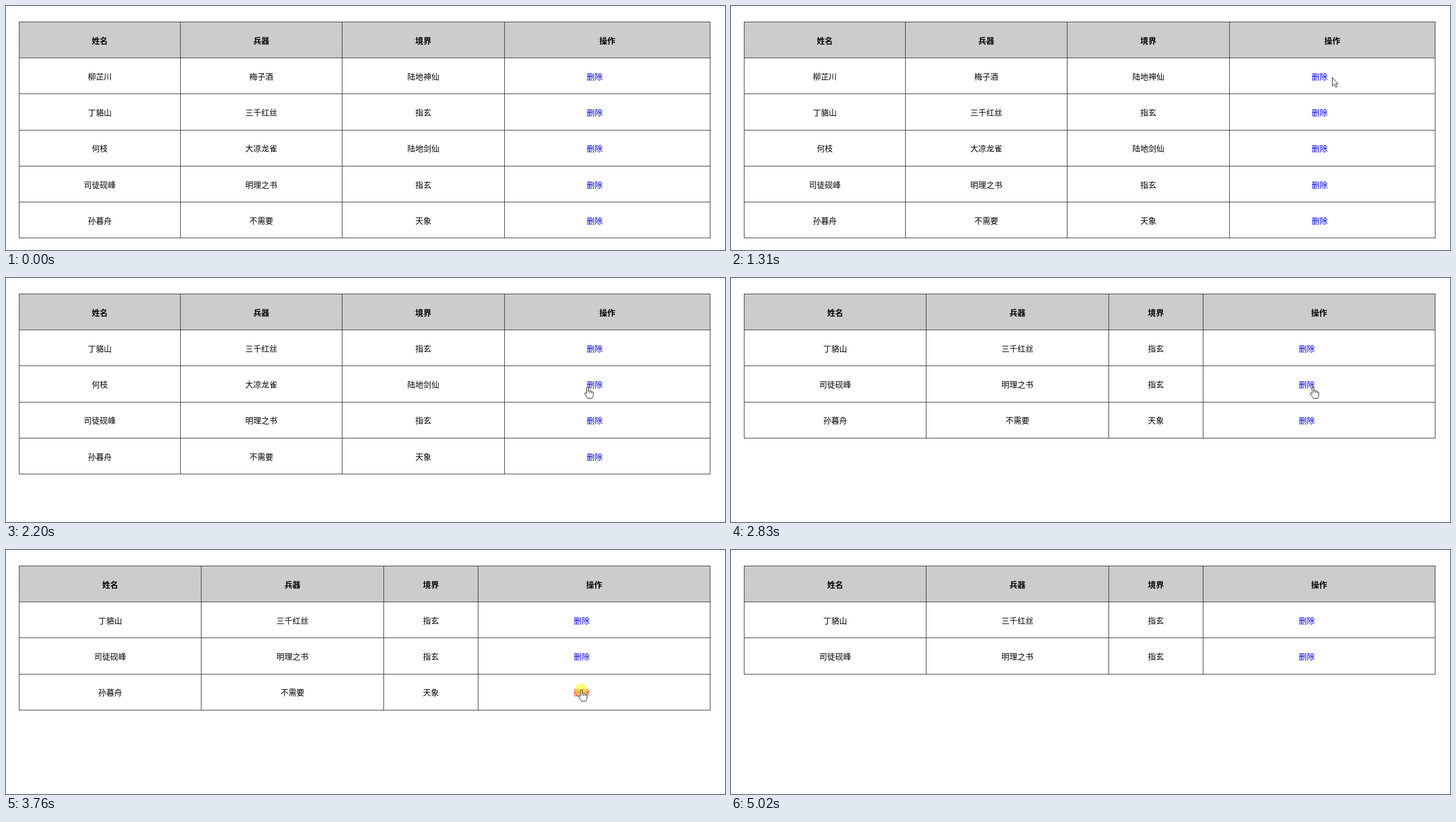
These frames come from a looping animation (1280 by 435 pixels, 5.33 s). An HTML page with a canvas:

```html
<!DOCTYPE html>
<html lang="zh-CN">
<head>
<meta charset="utf-8">
<style>
  html, body { margin: 0; width: 100%; height: 100%; overflow: hidden; background: #fff; }
  canvas { display: block; }
</style>
</head>
<body>
<canvas id="stage" width="1280" height="435"></canvas>
<script>
const ctx = document.getElementById('stage').getContext('2d');
const LOOP = 5330, TOP = 28, ROW = 64.2;
const FONT = '14.2px "Noto Sans CJK SC", "Noto Sans CJK", sans-serif';

const HEAD = ['姓名', '兵器', '境界', '操作'];
// Each row: cells and the time it is deleted
const ROWS = [
  { cells: ['柳芷川', '梅子酒', '陆地神仙'], end: 1860 },
  { cells: ['丁貉山', '三千红丝', '指玄'], end: Infinity },
  { cells: ['何枝', '大凉龙雀', '陆地剑仙'], end: 2830 },
  { cells: ['司徒砚峰', '明理之书', '指玄'], end: Infinity },
  { cells: ['孙暮舟', '不需要', '天象'], end: 3910 }
];
const WIDE = { cols: [23, 310, 598, 887, 1253], link: 1048 };
const NARROW = { cols: [23, 347, 672, 840, 1253], link: 1025 };
const PRESSES = [[1710, 1860], [2740, 2830], [3760, 3910]];

// Pointer moves: first step, last step, number of steps, end x, end y, easing
const easeOut = p => 1 - (1 - p) ** 1.5;
const easeIn = p => p ** 1.4;
const linear = p => p;
const MOVES = [
  [750, 1240, 7, 1073, 129, easeOut],
  [1310, 1310, 1, 1070, 127, linear],
  [1390, 1550, 3, 1038, 121, linear],
  [1940, 2200, 4, 1035, 194, linear],
  [2500, 2580, 2, 1036, 194, linear],
  [2900, 3210, 5, 1028, 261, linear],
  [3290, 3430, 3, 1024, 249, linear],
  [4070, 4230, 3, 1013, 271, linear],
  [4310, 4390, 2, 1010, 275, linear],
  [4550, 4940, 6, 1215, 424, easeIn]
];

const ARROW = new Path2D('M.5 .5V16L4 12.6L6.5 18L8.8 17L6.4 11.7H11Z');
const HAND = new Path2D('M-1.5 12V2Q-1.5 .5 0 .5T1.5 2V7.5V6.5Q3 5 4.5 7V9V7.5Q6.2 6 7.5 8' +
  'V10V9Q10.5 8 10.5 11V14.5Q10.5 17 8.5 20.5H.5Q-1 17.5-4.5 13Q-5.5 10.8-3.7 10.8Q-2.6 10.8-1.5 12Z');
const CREASES = new Path2D('M1.5 7V10.5M4.5 8V11M7.5 9V11.5');

const rowsAt = t => ROWS.filter(r => t < r.end);
const layoutAt = t => t < 2830 ? WIDE : NARROW;
const lineY = i => Math.round(TOP + ROW * i);
const midY = i => TOP + ROW * i + 33.5;

function pointerAt(t) {
  let x = 1292, y = 232;
  for (const [from, to, n, x1, y1, ease] of MOVES) {
    if (t < from) break;
    const gap = (to - from) / (n - 1) || 1;
    const step = Math.min(n, Math.floor((t - from) / gap + 1.001));
    const p = ease(step / n);
    x += (x1 - x) * p;
    y += (y1 - y) * p;
  }
  return { x: Math.round(x), y: Math.round(y) };
}

// Row whose link lies under the pointer, or -1
function linkUnder(p, t) {
  if (Math.abs(p.x - layoutAt(t).link) > 14) return -1;
  return rowsAt(t).findIndex((r, i) => Math.abs(p.y - midY(i + 1)) <= 10);
}

function label(text, x, i, color = '#000', weight = '') {
  ctx.font = weight + FONT;
  ctx.fillStyle = color;
  ctx.fillText(text, x, midY(i) + 5.3);
}

function drawTable(t, active) {
  const { cols, link } = layoutAt(t);
  const rows = rowsAt(t);
  const mid = c => (cols[c] + cols[c + 1]) / 2 + .5;
  const bottom = lineY(rows.length + 1);
  ctx.textAlign = 'center';
  ctx.fillStyle = '#ccc';
  ctx.fillRect(23, TOP, 1231, lineY(1) - TOP);
  HEAD.forEach((s, c) => label(s, mid(c), 0, '#000', 'bold '));
  rows.forEach((r, i) => {
    r.cells.forEach((s, c) => label(s, mid(c), i + 1));
    label('删除', link, i + 1, i === active ? '#f00' : '#00e');
  });
  ctx.fillStyle = '#333';
  for (let i = 0; i <= rows.length + 1; i++) ctx.fillRect(23, lineY(i), 1231, 1);
  for (const x of cols) ctx.fillRect(x, TOP, 1, bottom - TOP + 1);
}

function drawPointer(p, hand, pressed) {
  if (pressed) {
    ctx.fillStyle = 'rgba(255,255,0,.55)';
    ctx.beginPath();
    ctx.arc(p.x, p.y, 11, 0, 7);
    ctx.fill();
  }
  const shape = hand ? HAND : ARROW;
  ctx.save();
  ctx.translate(p.x, p.y);
  ctx.fillStyle = '#fff';
  ctx.strokeStyle = '#222';
  ctx.lineWidth = 1;
  ctx.fill(shape);
  ctx.stroke(shape);
  if (hand) ctx.stroke(CREASES);
  ctx.restore();
}

function frame(now) {
  const t = now % LOOP;
  const p = pointerAt(t);
  const pressed = PRESSES.some(([a, b]) => t >= a && t < b);
  ctx.fillStyle = '#fff';
  ctx.fillRect(0, 0, 1280, 435);
  drawTable(t, pressed ? linkUnder(p, t) : -1);
  // The pointer shape reacts a moment after the table changes
  if (t >= 750 && t < 5020) drawPointer(p, linkUnder(p, t - 160) >= 0, pressed);
  requestAnimationFrame(frame);
}
requestAnimationFrame(frame);
</script>
</body>
</html>
```
